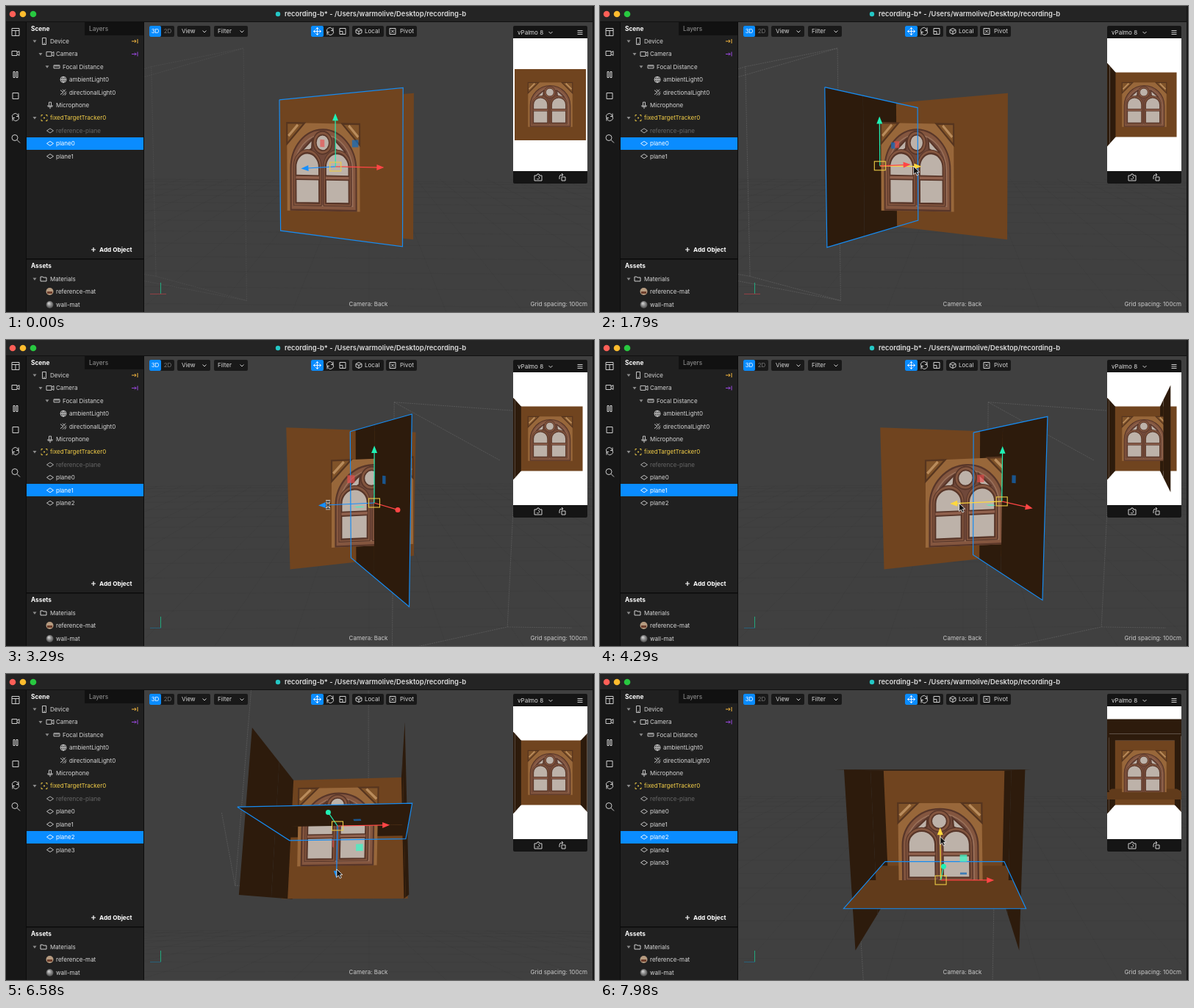
Animation, 800 px wide and 417 px high, one loop 8000 ms. Source, as an HTML page with a canvas:

```html
<!DOCTYPE html>
<html lang="en">
<head>
<meta charset="utf-8">
<title>Scene editor</title>
<style>
html, body { margin: 0; width: 100%; height: 100%; overflow: hidden; background: #404040; }
canvas { display: block; width: 800px; height: 417px; }
</style>
</head>
<body>
<canvas id="stage" width="800" height="417"></canvas>
<script>
const ctx = document.getElementById('stage').getContext('2d');
const LOOP = 8000;
const BLUE = '#0a8cff', YELLOW = '#ffd83d', RED = '#ff4545', GREEN = '#20f0b4';
const WOOD = [112, 68, 31];
const BACK_Z = -.37, WINDOW = .57, AXIS = .35;
const rad = deg => deg * Math.PI / 180;
const mix = (a, b, p) => a + (b - a) * p;
const ramp = (t, start, end, from = 0, to = 1) =>
  mix(from, to, Math.min(1, Math.max(0, (t - start) / (end - start))));

// Orbit poses: scene centre on screen, yaw and pitch in degrees, distance.
const orbit = [
  { from: 0, to: 2300, pose: [429, 220, 27, 2, 2.2] },
  { from: 2800, to: 4900, pose: [501, 222, -21, 6.5, 2.2] },
  { from: 5400, to: 5950, pose: [499, 222, -8, 5, 2.25] },
  { from: 6300, to: 6950, pose: [451, 207, 4, -12, 2.4] },
  { from: 7500, to: LOOP, pose: [463, 233, 0, 10.5, 2.3] }];

function editorCamera(t) {
  const i = orbit.findIndex(o => t <= o.to);
  const b = orbit[i], a = orbit[i - 1] || b;
  const p = a === b ? 1 : ramp(t, a.to, b.from), ease = p * p * (3 - 2 * p);
  const [x, y, yaw, pitch, d] = b.pose.map((v, n) => mix(a.pose[n], v, ease));
  return { x, y, yaw: rad(yaw), pitch: rad(pitch), d, focal: 460, px: 494, py: 220 };
}
const phoneCamera = { x: 740.5, y: 134.5, yaw: 0, pitch: 0, d: 1.82, focal: 193, px: 740.5, py: 134.5 };

function project(cam, [x, y, z]) {
  const c = Math.cos(cam.yaw), s = Math.sin(cam.yaw);
  const cp = Math.cos(cam.pitch), sp = Math.sin(cam.pitch);
  const side = x * c - z * s, near = x * s + z * c;
  const k = 1 / (cam.d - near * cp - y * sp);
  return [cam.px + (side * cam.focal + (cam.x - cam.px) * cam.d) * k,
    cam.py + ((near * sp - y * cp) * cam.focal + (cam.y - cam.py) * cam.d) * k];
}

const along = (p, v, k) => p.map((c, i) => c + v[i] * k);
// A plane has a centre and right, up and normal axes.
function upright(x, z, turn) {
  const c = Math.cos(turn), s = Math.sin(turn);
  return { at: [x, 0, z], right: [c, 0, -s], up: [0, 1, 0], normal: [s, 0, c] };
}
function tilted(y, turn) {
  const c = Math.cos(turn), s = Math.sin(turn);
  return { at: [0, y, 0], right: [1, 0, 0], up: [0, c, s], normal: [0, -s, c] };
}
function corners(plane, size = 1) {
  return [[-1, 1], [1, 1], [1, -1], [-1, -1]].map(([u, v]) =>
    along(along(plane.at, plane.right, u * size / 2), plane.up, v * size / 2));
}
const facing = upright(0, 0, 0), backWall = upright(0, BACK_Z, 0);

function planesAt(t) {
  const quarter = Math.PI / 2;
  const list = [upright(ramp(t, 1200, 1800, 0, -.45), ramp(t, 2300, 2800, -.17, 0),
    ramp(t, 400, 900, 0, quarter))];
  if (t >= 2200) list.push(upright(ramp(t, 3300, 5200, 0, .47), 0, -ramp(t, 2900, 3150, 0, quarter)));
  if (t >= 7000) list.push({ ...tilted(ramp(t, 7000, 7400, 0, .5), quarter), twoSided: true });
  if (t >= 5950) list.push(tilted(ramp(t, 7500, 7980, 0, -.25),
    t < 7000 ? ramp(t, 6050, 6300, 0, quarter) : -quarter));
  return list;
}

// Keeps the part of a polygon on one side of a depth.
function cut(points, z, sign) {
  const out = [];
  points.forEach((a, i) => {
    const b = points[(i + 1) % points.length];
    const da = (a[2] - z) * sign, db = (b[2] - z) * sign;
    if (da >= 0) out.push(a);
    if (da * db < 0) out.push(a.map((v, n) => mix(v, b[n], da / (da - db))));
  });
  return out;
}

function poly(points, fill, stroke, width = 1) {
  ctx.beginPath();
  points.forEach(p => ctx.lineTo(...p));
  if (fill) { ctx.closePath(); ctx.fillStyle = fill; ctx.fill(); }
  if (stroke) { ctx.strokeStyle = stroke; ctx.lineWidth = width; ctx.stroke(); }
}
function rect(x, y, w, h, color, r = 0) {
  ctx.fillStyle = color;
  ctx.beginPath(); ctx.roundRect(x, y, w, h, r); ctx.fill();
}
function dot(x, y, r, color) {
  ctx.fillStyle = color;
  ctx.beginPath(); ctx.arc(x, y, r, 0, 7); ctx.fill();
}
function text(s, x, y, color = '#d8d8d8', weight = 400, size = 8, align = 'left') {
  ctx.font = `${weight} ${size}px Inter, sans-serif`;
  ctx.textAlign = align; ctx.textBaseline = 'middle';
  ctx.fillStyle = color; ctx.fillText(s, x, y + .5);
}
function icon(path, x, y, color = '#d0d0d0', width = 1) {
  ctx.save();
  ctx.translate(x, y);
  ctx.strokeStyle = color; ctx.lineWidth = width;
  ctx.stroke(new Path2D(path));
  ctx.restore();
}

const I = {
  layout: 'M-5-5H5V5H-5ZM-5-2H5M0-2V5',
  camera: 'M-5-3H2V3H-5ZM2-1L5-3V3L2 1',
  pause: 'M-3-4H-1V4H-3ZM1-4H3V4H1Z',
  box: 'M-4-4H4V4H-4Z',
  refresh: 'M-4 1A4 4 0 0 1 3-3L4-1M4-5V-1H1M4-1A4 4 0 0 1-3 3L-4 1M-4 5V1H-1',
  search: 'M3-1A4 4 0 1 1-5-1A4 4 0 1 1 3-1M2 2L6 6',
  device: 'M-2.5-4.5H2.5V4.5H-2.5ZM-1 3H1',
  ruler: 'M-4-2H4V2H-4ZM-2-2V0M0-2V0M2-2V0',
  globe: 'M4 0A4 4 0 1 1-4 0A4 4 0 1 1 4 0M-4 0H4M0-4V4M0-4Q-4 0 0 4Q4 0 0-4',
  sun: 'M-4-3L0 0M-4 3L0 0M-1-4L2-1M3-4L0-1M-1 4L4-1M2 4L4 1',
  mic: 'M-1.5-4H1.5V1H-1.5ZM-3 0V2H3V0M0 2V5',
  tracker: 'M-2-4H-4V-2M2-4H4V-2M-4 2V4H-2M4 2V4H2M-1 0H1M0-1V1',
  plane: 'M-4.5 0L0-3L4.5 0L0 3Z',
  folder: 'M-4-3H-1L0-2H4V3H-4Z',
  down: 'M-2.5-1L0 1.5L2.5-1',
  move: 'M-5 0H5M0-5V5M-3-2L-5 0L-3 2M3-2L5 0L3 2M-2-3L0-5L2-3M-2 3L0 5L2 3',
  scale: 'M-4-4H4V4H-4ZM-4 0H0V4',
  cube: 'M0-4L4-2V2L0 4L-4 2V-2ZM-4-2L0 0L4-2M0 0V4',
  pivot: 'M-4-4H4V4H-4ZM-2-2L2 2M2-2L-2 2',
  arrow: 'M-4 0H2M0-2L2 0L0 2M4-3V3',
  menu: 'M-3.5-2.5H3.5M-3.5 0H3.5M-3.5 2.5H3.5',
  snap: 'M-5-3H-2L-1-5H1L2-3H5V4H-5ZM-2 1A2 2 0 1 0 0-2',
  turn: 'M-1-1H4V4H-1ZM-4 2V-1A3 3 0 0 1-1-4H1M-1-6L1-4L-1-2'
};

function arch(x, w, top, bottom) {
  ctx.beginPath();
  ctx.moveTo(x, bottom);
  ctx.arc(x + w / 2, top + w / 2, w / 2, Math.PI, 0);
  ctx.lineTo(x + w, bottom);
  ctx.closePath();
}
function paint(fill, edge, width) {
  ctx.fillStyle = fill; ctx.fill();
  ctx.strokeStyle = edge; ctx.lineWidth = width; ctx.stroke();
}
// Drawn on a 100 by 100 square laid over the projected corners.
function framedWindow([a, b, c, d]) {
  const axis = n => [(b[n] - a[n] + c[n] - d[n]) / 200, (d[n] - a[n] + c[n] - b[n]) / 200];
  const [rx, dx] = axis(0), [ry, dy] = axis(1);
  const middle = n => (a[n] + b[n] + c[n] + d[n]) / 4;
  ctx.save();
  ctx.transform(rx, ry, dx, dy, middle(0), middle(1));
  ctx.translate(-50, -50);
  rect(0, 0, 100, 100, '#98673a');
  const edge = '#583629', frame = '#84563f', glass = '#bdb2a9';
  for (const s of [1, -1]) {
    ctx.save();
    ctx.translate(50, 0); ctx.scale(s, 1); ctx.translate(-50, 0);
    poly([[0, 0], [24, 0], [0, 24]], '#805329', '#56351f', 2);
    poly([[2, 15], [15, 2]], null, '#b98c5c', 3);
    ctx.restore();
  }
  arch(5, 90, 7, 99); paint(frame, edge, 2);
  arch(10, 80, 13, 94); paint('#70483a', '#997059', 1.5);
  for (const s of [1, -1])
    poly([[20, 32], [35, 18], [34, 29], [25, 34]].map(([x, y]) => [50 + (x - 50) * s, y]), glass, edge, 2);
  for (const [r, fill] of [[13, frame], [9, glass]]) {
    ctx.beginPath(); ctx.arc(49, 22, r, 0, 7); paint(fill, edge, 1.5);
  }
  for (const x of [11, 52]) {
    arch(x - 2, 38, 30, 94); paint(frame, edge, 1);
    arch(x + 1, 32, 34, 91); paint(glass, edge, 2);
    rect(x + 1, 59, 32, 6, edge);
    rect(x + 1, 60.5, 32, 3, '#91624e');
  }
  ctx.restore();
}

// Draws from far to near, split at the back wall and at the window.
function room(cam, planes) {
  const flat = points => points.map(p => project(cam, p));
  const faces = planes.map(plane => {
    const shape = corners(plane), q = flat(shape);
    const area = (q[2][0] - q[0][0]) * (q[3][1] - q[1][1]) - (q[2][1] - q[0][1]) * (q[3][0] - q[1][0]);
    const [, ny, nz] = plane.normal;
    const light = .4 + .6 * Math.max(0, nz) + .47 * Math.max(0, ny);
    return { shape, visible: plane.twoSided || area > 0, color: `rgb(${WOOD.map(v => Math.round(v * light))})` };
  }).filter(f => f.visible);
  const slab = (from, to) => faces.forEach(f =>
    poly(flat(cut(cut(f.shape, from, 1), to, -1)), f.color));
  slab(-2, BACK_Z);
  poly(flat(corners(backWall)), `rgb(${WOOD})`);
  slab(BACK_Z, 0);
  framedWindow(flat(corners(facing, WINDOW)));
  slab(.001, 2);
}

function backdrop(t, cam) {
  rect(188, 22, 612, 395, '#404040');
  const horizon = 252 - cam.focal * Math.tan(cam.pitch);
  ctx.save();
  ctx.globalAlpha = .22;
  for (let i = 0; i < 17; i++) {
    const y = horizon + i * 2 + i * i * .85;
    poly([[188, y], [800, y + cam.yaw * 12]], null, '#303030', .7);
  }
  for (let i = -14; i < 15; i++)
    poly([[494 + i * 32, horizon], [494 + i * 105, 417]], null, '#303030', .6);
  // Viewing frustum of the device camera.
  ctx.globalAlpha = t < 1000 ? .35 : .75;
  ctx.setLineDash([2, 1]);
  const outline = (z, k) => corners(upright(0, z, 0), .95 * k)
    .map(([x, y, depth]) => project(cam, [x * .6, y, depth]));
  const screen = outline(.9, 1), apex = outline(1.3, .56);
  poly([...screen, screen[0]], null, '#737373', .6);
  screen.forEach((p, i) => poly([p, apex[i]], null, '#737373', .6));
  ctx.restore();
  const early = t < 2550;
  poly([[210.5, 377], [210.5, 393]], null, '#22a77c');
  poly([[196, 392.5], [early ? 218 : 211, 392.5]], null, early ? '#914044' : '#28607a');
}

function axis([x, y], [tx, ty], color) {
  const dx = tx - x, dy = ty - y, len = Math.hypot(dx, dy) || 1;
  poly([[x, y], [tx, ty]], null, color, 1.2);
  if (len < 37) return dot(tx, ty, 3.5, color);
  const ux = dx / len, uy = dy / len;
  poly([[4, 0], [-6, 4], [-6, -4]].map(([f, s]) => [tx + ux * f - uy * s, ty + uy * f + ux * s]), color);
}
function gizmo(t, cam, plane) {
  const { at, right, up, normal } = plane;
  const show = p => project(cam, p), origin = show(at);
  const handle = (a, b, color) => poly([[.38, .38], [.52, .38], [.52, .52], [.38, .52]]
    .map(([m, n]) => show(along(along(at, a, m * AXIS), b, n * AXIS))), color);
  const outline = corners(plane).map(show);
  poly([...outline, outline[0]], null, '#168bf1', 1.2);
  handle(up, normal, 'rgba(235,75,75,.65)');
  handle(up, right, 'rgba(20,105,185,.75)');
  handle(right, normal, 'rgba(70,240,195,.8)');
  const dragging = [[1200, 1900], [3350, 5200], [7500, LOOP]].some(([a, b]) => t > a && t < b);
  axis(origin, show(along(at, normal, AXIS)), dragging ? YELLOW : '#168fff');
  axis(origin, show(along(at, up, AXIS)), GREEN);
  axis(origin, show(along(at, right, AXIS)), RED);
  ctx.strokeStyle = '#eccb45'; ctx.lineWidth = 1.1;
  ctx.strokeRect(origin[0] - 7.5, origin[1] - 6, 15, 12);
  if (t > 300) cursor(t, ...show(along(at, normal, AXIS * .88)));
}
function cursor(t, x, y) {
  if (t > 3000 && t < 3350) {
    const bar = 'M-3-5H3M0-5V5M-3 5H3M-2 0H2';
    icon(bar, x, y, '#fff', 3);
    icon(bar, x, y, '#111', 1.2);
    return;
  }
  ctx.save();
  ctx.translate(x, y);
  paintPath('M0 0V11L2.6 8.6L4.5 12.5L6.5 11.5L4.7 7.8L8 7.6Z', '#111', '#fff');
  ctx.restore();
}
function paintPath(d, fill, stroke) {
  const path = new Path2D(d);
  ctx.fillStyle = fill; ctx.fill(path);
  ctx.strokeStyle = stroke; ctx.lineWidth = .8; ctx.stroke(path);
}

function preview(planes) {
  rect(690, 27, 101, 215, '#151515', 2);
  rect(690, 44, 101, 181, '#fff');
  text('vPalmo 8', 696, 36, '#ddd');
  icon(I.down, 741, 36); icon(I.menu, 781, 36);
  icon(I.snap, 724, 234); icon(I.turn, 757, 234);
  ctx.save();
  ctx.beginPath(); ctx.rect(690, 44, 101, 181); ctx.clip();
  room(phoneCamera, planes);
  ctx.restore();
}

function toolbar() {
  const button = (x, w, label, lx) => { rect(x, 27, w, 15, '#191919', 2); text(label, lx, 34.5); };
  rect(195, 27, 34, 15, '#191919', 2);
  rect(195, 27, 16, 15, BLUE, 2);
  text('3D', 203, 34.5, '#fff', 400, 8, 'center');
  text('2D', 220, 34.5, '#777', 400, 8, 'center');
  button(233, 45, 'View', 239); icon(I.down, 270, 34.5);
  button(283, 46, 'Filter', 288); icon(I.down, 321, 34.5);
  rect(415, 27, 52, 15, '#191919', 2);
  rect(415, 27, 17, 15, BLUE, 2);
  icon(I.move, 423.5, 34.5, '#fff', .9);
  icon(I.refresh, 441, 34.5); icon(I.scale, 458, 34.5);
  button(471, 43, 'Local', 488); icon(I.cube, 480, 34.5);
  button(517, 42, 'Pivot', 536); icon(I.pivot, 526, 34.5);
  text('Camera: Back', 493, 406, '#ccc', 400, 8, 'center');
  text('Grid spacing: 100cm', 791, 406, '#ccc', 400, 8, 'right');
}

function expander(x, y) {
  poly([[x - 2.5, y - 1.5], [x + 2.5, y - 1.5], [x, y + 2]], '#8c8c8c');
}
function sidebar(t) {
  rect(0, 22, 28, 395, '#171717');
  rect(28, 22, 160, 395, '#202020');
  rect(107, 22, 80, 18, '#111');
  rect(27, 22, 1, 395, '#0c0c0c');
  rect(187, 22, 1, 395, '#0c0c0c');
  rect(28, 344, 160, 1.5, '#0a0a0a');
  ['layout', 'camera', 'pause', 'box', 'refresh', 'search']
    .forEach((name, i) => icon(I[name], 13, 35.5 + i * 29));
  text('Scene', 34, 31, '#fff', 700, 8.3);
  text('Layers', 113, 31, '#999', 400, 8.3);

  const planes = ['plane0', 'plane1'];
  if (t >= 2200) planes.push('plane2');
  if (t >= 5950) planes.push('plane3');
  if (t >= 7000) planes.splice(3, 0, 'plane4');
  const chosen = t < 2200 ? 0 : t < 5950 ? 1 : 2;
  const row = n => 48 + n * 17.42;
  rect(28, Math.round(row(8 + chosen) - 8.4), 159, 17, BLUE);
  const rows = [['Device', 60, 'device'], ['Camera', 68, 'camera'], ['Focal Distance', 77, 'ruler'],
    ['ambientLight0', 86, 'globe'], ['directionalLight0', 86, 'sun'], ['Microphone', 68, 'mic'],
    ['fixedTargetTracker0', 60, 'tracker'], ['reference-plane', 68, 'plane'],
    ...planes.map(p => [p, 68, 'plane'])];
  rows.forEach(([label, x, name], n) => {
    const color = n === 6 ? '#f3ce48' : n === 7 ? '#666' : n === 8 + chosen ? '#fff' : '#d5d5d5';
    icon(I[name], x - 8, row(n), n === 7 ? '#bbb' : color, .9);
    text(label, x, row(n), color);
    if (n < 3 || n === 6) expander(x - 21, row(n));
  });
  icon(I.arrow, 175, 48, '#f3b63f'); icon(I.arrow, 175, 65.5, '#9a48df');

  icon('M-3 0H3M0-3V3', 119, 332, '#fff', 1.2);
  text('Add Object', 127, 332, '#fff', 700, 8.2);
  text('Assets', 34, 354, '#fff', 700, 8.3);
  expander(39, 372); icon(I.folder, 51, 372);
  text('Materials', 60, 372);
  dot(59.5, 389, 5, '#b69b80');
  rect(56, 389, 7, 3, '#6d3f2d');
  const ball = ctx.createRadialGradient(58, 405, 0, 60, 407, 6);
  ball.addColorStop(0, '#ddd'); ball.addColorStop(1, '#333');
  dot(59.5, 407, 5, ball);
  text('reference-mat', 68, 389.5);
  text('wall-mat', 68, 407);
}

function titleBar() {
  rect(0, 0, 800, 22, '#242424');
  rect(0, 21, 800, 1, '#111');
  ['#ff5f57', '#febc2e', '#28c840'].forEach((c, i) => dot(9 + i * 14, 11, 4.3, c));
  dot(370, 11, 3.2, '#24c7c5');
  text('recording-b* - /Users/warmolive/Desktop/recording-b', 379, 10.5, '#ddd', 600, 9.4);
}

function draw() {
  const now = performance.now() % LOOP;
  const t = Math.max(0, Math.floor((now + 20) / 100) * 100 - 10);
  const cam = editorCamera(t), planes = planesAt(t);
  backdrop(t, cam);
  room(cam, planes);
  gizmo(t, cam, planes[planes.length - 1]);
  toolbar();
  preview(planes);
  sidebar(t);
  titleBar();
  rect(798, 0, 2, 417, '#161616');
  requestAnimationFrame(draw);
}
draw();
</script>
</body>
</html>
```
